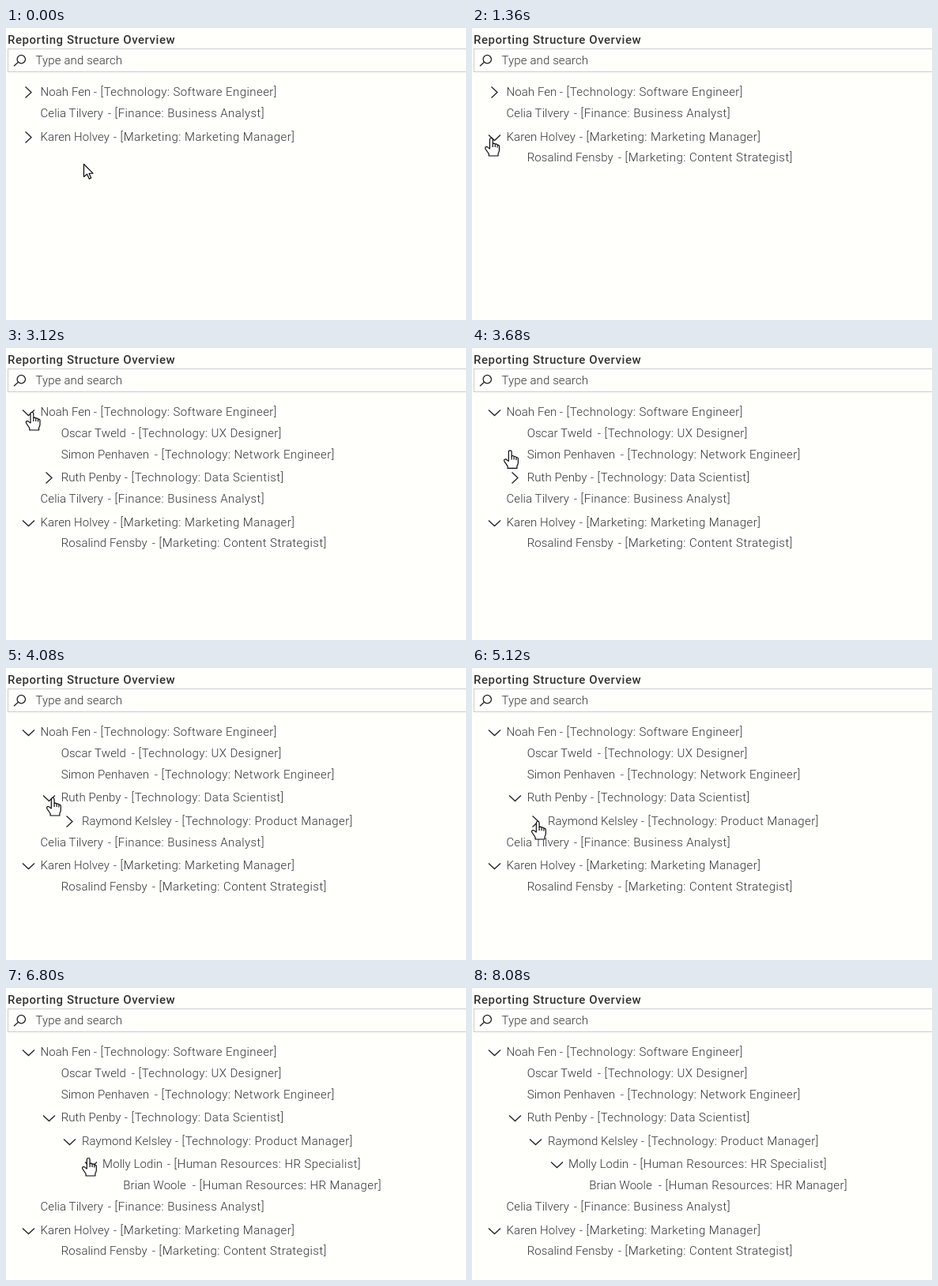
An HTML page that plays this animation: 582x370 px, repeating every 8.32 s.

```html
<!DOCTYPE html>
<html lang="en">
<head>
<meta charset="utf-8">
<title>Reporting Structure Overview</title>
<style>
  html, body { margin: 0; width: 100%; height: 100%; overflow: hidden; background: #fffffc; }
  svg { display: block; width: 582px; height: 370px; }
  text { font: 300 15px Roboto, "Open Sans", sans-serif; fill: #333; white-space: pre; }
  .title { font-weight: 500; letter-spacing: .55px; }
  .hint { letter-spacing: .12px; }
  .name { letter-spacing: .08px; }
  .role { letter-spacing: .43px; }
  .line { fill: none; stroke: #222; stroke-width: 1.3; }
  .box { fill: none; stroke: #ccc; }
  .pointer { fill: #fff; stroke: #000; stroke-width: 1.15; stroke-linejoin: round; }
</style>
</head>
<body>
<svg viewBox="0 0 582 370">
  <text class="title" x="2" y="20">Reporting Structure Overview</text>
  <rect class="box" x="2.5" y="26.5" width="600" height="29"/>
  <path class="line" d="M15.5 43.2L10 48.2"/>
  <circle class="line" cx="19.3" cy="39.6" r="5.2"/>
  <text class="hint" x="37.5" y="46">Type and search</text>
  <g id="tree"></g>
  <path id="arrow" class="pointer" d="M0 0V16L4 12.6L6.7 18.6L9.2 17.5L6.6 11.7H11.5Z"/>
  <g id="hand" class="pointer">
    <path d="M-2 14V2.4a1.9 1.9 0 0 1 3.8 0V7.5q1.6-1 3 .6q1.8-.7 2.8 1q2.4-.3 2.4 2V16q0 2-1.4 4V23H-3.2V20.5L-7.4 14.2q-.8-2 .8-2.6q1.6-.3 2.6 1Z"/>
    <path fill="none" d="M1.8 7.5V12M4.8 8.5V12M7.6 9.5V12.5"/>
  </g>
</svg>
<script>
const LOOP = 8320, STEP = 80, NEVER = Infinity;
const LEAF_GAP = 26.75, PARENT_GAP = 29.6, INDENT = 26.2;
const OPEN = "M-7 -3L.5 4L8 -3", CLOSED = "M-3.5 -7L4 0L-3.5 7";

// name, role, level, x of the role, time shown, time opened (parents only)
const people = [
  ["Noah Fen", "Technology: Software Engineer", 0, 120, 0, 2320],
  ["Oscar Tweld", "Technology: UX Designer", 1, 168, 2320],
  ["Simon Penhaven", "Technology: Network Engineer", 1, 197, 2320],
  ["Ruth Penby", "Technology: Data Scientist", 1, 159, 2320, 4000],
  ["Raymond Kelsley", "Technology: Product Manager", 2, 223, 4000, 5200],
  ["Molly Lodin", "Human Resources: HR Specialist", 3, 213, 5200, 6560],
  ["Brian Woole", "Human Resources: HR Manager", 4, 245, 6560],
  ["Celia Tilvery", "Finance: Business Analyst", 0, 138, 0],
  ["Karen Holvey", "Marketing: Marketing Manager", 0, 145, 0, 960],
  ["Rosalind Fensby", "Marketing: Content Strategist", 1, 194, 960]
];

// pointer moves: start, end, x, y reached
const moves = [
  [80, 880, 24.5, 139],
  [1360, 2160, 33, 81],
  [3280, 4000, 59.3, 164],
  [4400, 5120, 83.3, 194],
  [5520, 6160, 104.3, 215],
  [7600, 7840, 66, 200]
];
const HAND_FROM = 640, POINTER_GONE = 7840;

const byId = id => document.getElementById(id);

function add(parent, tag, attrs, text = "") {
  const el = document.createElementNS("http://www.w3.org/2000/svg", tag);
  for (const key in attrs) el.setAttribute(key, attrs[key]);
  el.textContent = text;
  return parent.appendChild(el);
}

const show = (el, on) => el.setAttribute("visibility", on ? "visible" : "hidden");
const place = (el, x, y) => el.setAttribute("transform", `translate(${x} ${y})`);

const rows = people.map(([name, role, level, roleX, from, opens]) => {
  const g = add(byId("tree"), "g", {});
  const x = 43.5 + level * INDENT;
  add(g, "text", { class: "name", x, y: 5 }, name);
  add(g, "text", { class: "role", x: roleX - 9.2, y: 5 }, `- [${role}]`);
  const mark = opens && add(g, "path", {
    class: "line", transform: `translate(${Math.round(x - 15.5)} .5)`
  });
  return { g, mark, from, opens: opens || NEVER };
});

function drawTree(t) {
  let y = 81.15;
  rows.forEach((row, i) => {
    const on = t >= row.from;
    show(row.g, on);
    if (!on) return;
    if (i) y += row.mark ? PARENT_GAP : LEAF_GAP;
    place(row.g, 0, Math.round(y));
    if (row.mark) row.mark.setAttribute("d", t >= row.opens ? OPEN : CLOSED);
  });
}

function drawPointer(t) {
  let x = 98.5, y = 172.5;
  for (const [start, end, toX, toY] of moves) {
    const p = Math.min(1, Math.max(0, (t - start) / (end - start)));
    const e = p * p * (3 - 2 * p);
    x += (toX - x) * e;
    y += (toY - y) * e;
  }
  place(byId("arrow"), x, y);
  place(byId("hand"), x, y);
  show(byId("arrow"), t < HAND_FROM);
  show(byId("hand"), t >= HAND_FROM && t < POINTER_GONE);
}

function frame() {
  const t = Math.floor(performance.now() % LOOP / STEP) * STEP;
  drawTree(t);
  drawPointer(t);
  requestAnimationFrame(frame);
}
frame();
</script>
</body>
</html>
```
